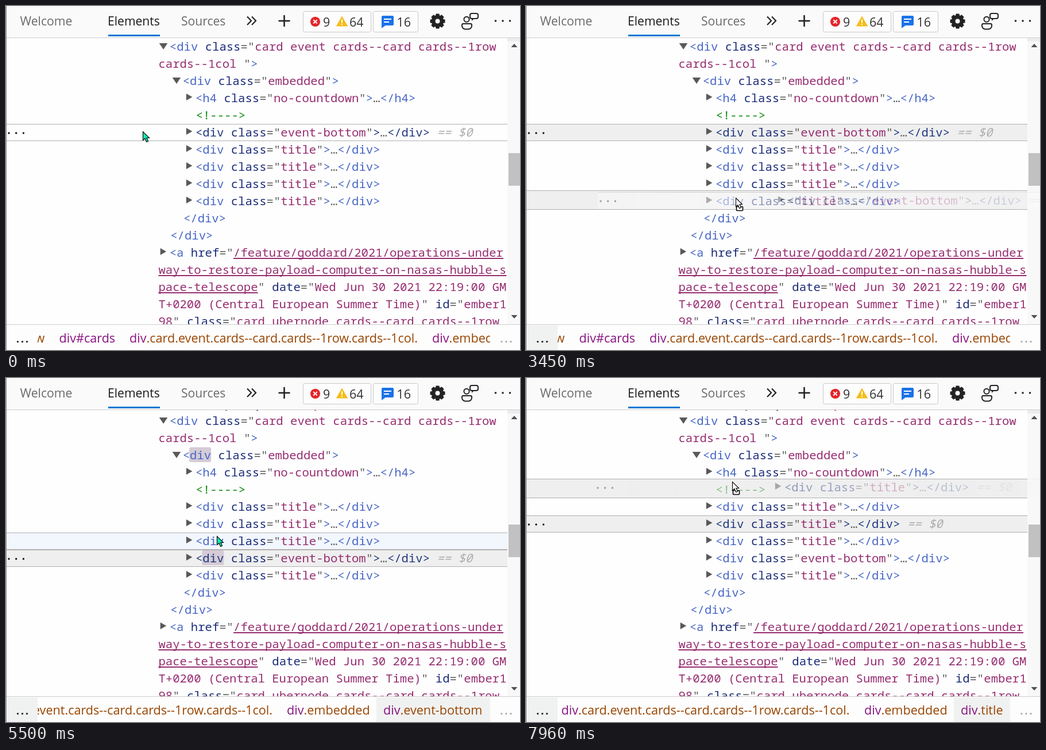
An HTML page with a canvas for the animation above (8000 ms loop, 895x601 px).

```html
<!DOCTYPE html>
<html lang="en">
<head>
<meta charset="utf-8">
<title>Reordering DOM nodes</title>
<style>
html, body { margin: 0; width: 100%; height: 100%; overflow: hidden; background: #fff; }
canvas { display: block; }
</style>
</head>
<body>
<canvas id="stage" width="895" height="601"></canvas>
<script>
const W = 895, H = 601, LOOP = 8000, ROW = 30, CELL = 12.37;
const MONO = '20.615px "Noto Sans Mono", monospace';
const UI = '"Open Sans", "Noto Sans", sans-serif';
const TAG = '#4867c6', TAG_SEL = '#21397f', ATTR = '#1b2c78', VAL = '#962d70', PUNCT = '#5c5c5c';
const GREEN = '#118a11', GREY = '#efefef', LINE = '#b0b0b0';
const stage = document.getElementById('stage').getContext('2d');
const ghostCanvas = document.createElement('canvas');
ghostCanvas.width = W;
ghostCanvas.height = ROW;
const ghostCtx = ghostCanvas.getContext('2d');

// Pointer tip: [time, x, y], each position held until the next.
const approach = [[0, 238, 219], [450, 262, 218], [570, 292, 217], [690, 322, 215], [840, 365, 214]];
const dragDown = [
  [1860, 365, 232], [1980, 366, 236], [2130, 367, 241], [2280, 368, 246], [2400, 369, 252],
  [2520, 369, 261], [2670, 370, 278], [2820, 370, 292], [2940, 369, 304], [3090, 368, 313],
  [3210, 367, 321], [3330, 366, 328], [3450, 365, 335], [3600, 365, 350], [3750, 365, 353],
  [3870, 365, 355], [4020, 365, 356]];
const browse = [
  [4270, 364, 354], [5110, 365, 338], [5230, 366, 312], [5350, 367, 290], [5500, 367, 276],
  [5620, 366, 268], [5740, 365, 260], [5860, 363, 254], [5980, 362, 252], [6970, 362, 253]];
const dragUp = [
  [7120, 359, 233], [7240, 359, 215], [7390, 359, 206], [7540, 359, 195], [7660, 359, 186],
  [7810, 359, 183], [7960, 359, 181]];
const pointerPath = [...approach, ...dragDown, ...browse, ...dragUp];

const within = (t, a, b) => t >= a && t < b;
const clamp = v => Math.max(0, Math.min(1, v));
const mix = (a, b, k) => `rgb(${a.map((v, i) => Math.round(v + (b[i] - v) * k))})`;

const attr = (name, value, close = true) =>
  [[ATTR, name], [PUNCT, '="'], [VAL, value], ...(close ? [[PUNCT, '"']] : [])];
const open = (tag, cls) => [[TAG, '<'], [TAG, tag], [TAG, ' '], ...attr('class', cls), [TAG, '>']];
const folded = (tag, cls) => ({
  x: 329.9, arrow: 'right',
  parts: [...open(tag, cls), [PUNCT, '…'], [TAG, `</${tag}>`]]
});
const wrapped = (...parts) => ({ x: 265.4, parts });

const titleRow = folded('div', 'title');
const bottomRow = folded('div', 'event-bottom');
const head = [
  { x: 284.8, arrow: 'down', parts: [[TAG, '<div '], ...attr('class', 'card event cards--card cards--1row', false)] },
  wrapped([VAL, 'cards--1col '], [PUNCT, '"'], [TAG, '>']),
  { x: 307.7, arrow: 'down', parts: open('div', 'embedded') },
  folded('h4', 'no-countdown'),
  { x: 330.6, parts: [[GREEN, '<!---->']] }
];
const tail = [
  { x: 308.9, parts: [[TAG, '</div>']] },
  { x: 286.2, parts: [[TAG, '</div>']] },
  { x: 284.7, arrow: 'right', parts: [[TAG, '<a '], [ATTR, 'href'], [PUNCT, '="'],
    [VAL, '/feature/goddard/2021/operations-under', true]] },
  wrapped([VAL, 'way-to-restore-payload-computer-on-nasas-hubble-s', true]),
  wrapped([VAL, 'pace-telescope', true], [PUNCT, '" '], ...attr('date', 'Wed Jun 30 2021 22:19:00 GM', false)),
  wrapped([VAL, 'T+0200 (Central European Summer Time)'], [PUNCT, '" '], ...attr('id', 'ember1', false)),
  wrapped([VAL, '98'], [PUNCT, '" '], ...attr('class', 'card ubernode cards--card cards--1row', false))
];

function rect(c, color, x, y, w, h) {
  c.fillStyle = color;
  c.fillRect(x, y, w, h);
}

function poly(c, points, fill, stroke, width = 1) {
  c.beginPath();
  points.forEach(([x, y]) => c.lineTo(x, y));
  c.closePath();
  if (fill) { c.fillStyle = fill; c.fill(); }
  if (stroke) { c.strokeStyle = stroke; c.lineWidth = width; c.stroke(); }
}

function path(c, points, color, width) {
  c.beginPath();
  points.forEach(([x, y], i) => i ? c.lineTo(x, y) : c.moveTo(x, y));
  c.strokeStyle = color;
  c.lineWidth = width;
  c.stroke();
}

function disc(c, x, y, r, fill, stroke, width) {
  c.beginPath();
  c.arc(x, y, r, 0, Math.PI * 2);
  if (fill) { c.fillStyle = fill; c.fill(); }
  if (stroke) { c.strokeStyle = stroke; c.lineWidth = width; c.stroke(); }
}

function box(c, x, y, w, h, r, fill, stroke, width = 1) {
  c.beginPath();
  c.roundRect(x, y, w, h, r);
  if (fill) { c.fillStyle = fill; c.fill(); }
  if (stroke) { c.strokeStyle = stroke; c.lineWidth = width; c.stroke(); }
}

function dots(c, x, y, gap, r, color) {
  for (let i = 0; i < 3; i++) disc(c, x + i * gap, y, r, color);
}

function label(c, text, x, y, size, color) {
  c.font = `${size}px ${UI}`;
  c.fillStyle = color;
  c.fillText(text, x, y);
  return c.measureText(text).width;
}

function band(c, top, bottom, fill) {
  if (fill) rect(c, fill, 1, top, 872, bottom - top);
  rect(c, LINE, 1, top, 872, 1);
  rect(c, LINE, 1, bottom - 1, 872, 1);
}

function drawRow(c, row, top, selected, flash) {
  let x = row.x;
  if (row.arrow === 'right') poly(c, [[x - 16, top + 7], [x - 5.5, top + 13], [x - 16, top + 19]], '#595959');
  if (row.arrow === 'down') poly(c, [[x - 18, top + 9], [x - 3.5, top + 9], [x - 10.7, top + 20]], '#595959');
  if (flash) {
    c.globalAlpha = flash.alpha;
    box(c, x + CELL - 1, top + 1, 3 * CELL + 1, 26, 3, flash.fill);
    c.globalAlpha = 1;
  }
  c.font = MONO;
  row.parts.forEach(([color, text, underline], i) => {
    if (selected && color === TAG) color = TAG_SEL;
    if (flash && !selected && i === 1) color = flash.text;
    c.fillStyle = color;
    c.fillText(text, x, top + 22);
    const width = text.length * CELL;
    if (underline) c.fillRect(x, top + 24, width, 2);
    x += width;
  });
  if (selected) {
    c.font = 'italic ' + MONO;
    c.fillStyle = '#adadad';
    c.fillText('== $0', x + CELL, top + 22);
    dots(c, 5, top + 16, 12.7, 1.7, '#111');
  }
}

function drawGhost(row, x, y, fill, cx, cy) {
  const g = ghostCtx;
  g.globalCompositeOperation = 'source-over';
  g.clearRect(0, 0, W, ROW);
  rect(g, fill, 0, 0, 873, ROW);
  rect(g, LINE, 0, 0, 873, 1);
  drawRow(g, row, 0, true);
  const fade = g.createRadialGradient(cx - x, cy - y, 0, cx - x, cy - y, 700);
  fade.addColorStop(0, 'rgba(0,0,0,.55)');
  fade.addColorStop(1, 'rgba(0,0,0,0)');
  g.globalCompositeOperation = 'destination-in';
  rect(g, fade, 0, 0, W, ROW);
  stage.drawImage(ghostCanvas, x, y);
}

function drawPointer(c, x, y, kind) {
  c.save();
  c.translate(x, y);
  if (kind === 'blocked') {
    for (const [color, width] of [['#000', 6], ['#fff', 1.4]]) {
      disc(c, 0, -7, 7, width > 2 ? '#ddd' : null, color, width);
      path(c, [[-5, -12], [5, -2]], color, width);
    }
  } else {
    if (kind === 'drop') box(c, 1.5, 15.5, 11, 7, 1, '#fff', '#000', 1.6);
    poly(c, [[0.5, 0.5], [0.5, 15.5], [4, 12.5], [6.7, 18.5], [9.5, 17.3], [7, 11.5], [11.5, 11.5]],
      kind === 'drop' ? '#fff' : '#0fe9b6', '#000', 1.1);
  }
  c.restore();
}

function drawToolbar(c) {
  rect(c, '#fafafa', 0, 0, W, 55);
  rect(c, '#cdcdcd', 0, 55, W, 1);
  label(c, 'Welcome', 24.5, 34, 21.2, '#6a6a6a');
  label(c, 'Elements', 177, 34, 21.1, '#1b1b1b');
  label(c, 'Sources', 305, 34, 21.1, '#6a6a6a');
  rect(c, '#0078d4', 178, 50, 90, 3);
  for (const x of [420, 428]) path(c, [[x, 18.5], [x + 7, 25.8], [x, 33]], '#222', 2.2);
  path(c, [[474.5, 26], [494.5, 26]], '#222', 2.6);
  path(c, [[484.5, 16], [484.5, 36]], '#222', 2.6);

  box(c, 517.5, 9.5, 118, 36, 3, '#fdfdfd', '#c9c9c9');
  disc(c, 538.5, 27.3, 8.6, '#e5252a');
  path(c, [[535.3, 24.1], [541.7, 30.5]], '#fff', 2);
  path(c, [[541.7, 24.1], [535.3, 30.5]], '#fff', 2);
  label(c, '9', 552, 36, 21.4, '#333');
  poly(c, [[585, 19.5], [593.5, 34.5], [576.5, 34.5]], '#f4bd1a', '#f4bd1a', 2);
  rect(c, '#fff', 584, 23.5, 2, 6);
  rect(c, '#fff', 584, 31, 2, 2);
  label(c, '64', 598, 36, 21.4, '#333');

  box(c, 639.5, 9.5, 78, 36, 3, '#fdfdfd', '#c9c9c9');
  box(c, 654, 17, 21, 17, 2, '#1a73e8');
  poly(c, [[654, 30], [662, 33], [654, 39]], '#1a73e8');
  rect(c, '#fff', 658, 22, 13, 2);
  rect(c, '#fff', 658, 27, 9, 2);
  label(c, '16', 680.5, 36, 21.4, '#333');

  c.save();
  c.translate(751.5, 26.5);
  for (let i = 0; i < 8; i++) {
    poly(c, [[-4, -8], [-2.8, -13], [2.8, -13], [4, -8]], '#222');
    c.rotate(Math.PI / 4);
  }
  disc(c, 0, 0, 7.3, null, '#222', 6.6);
  c.restore();

  disc(c, 802, 23.3, 4.6, null, '#222', 2);
  box(c, 794, 31, 17, 9.5, [2, 2, 6, 6], null, '#222', 2);
  box(c, 808, 13, 14, 9, 3, '#fafafa', '#222', 2);
  poly(c, [[811, 21], [816, 21], [811, 26]], '#222');
  dots(c, 852.5, 26, 12.5, 1.8, '#222');
}

function drawScrollbar(c, shift) {
  rect(c, '#f8f8f8', 873, 56, 22, 500);
  rect(c, '#ececec', 873, 56, 22, 6);
  rect(c, '#c1c1c1', 875, shift ? 256 : 257, 20, 57);
  poly(c, [[879.5, 72], [885, 66], [890.5, 72]], '#505050');
  poly(c, [[879.5, 540], [885, 546], [890.5, 540]], '#505050');
}

function crumb(c, text, x) {
  const [, element, rest] = text.match(/^(div)?(.*)$/);
  const width = element ? label(c, element, x, 588, 21.6, '#881280') : 0;
  label(c, rest, x + width, 588, 21.6, rest[0] === '#' ? '#881280' : '#994500');
}

function drawCrumbs(c, t, active) {
  const card = 'div.card.event.cards--card.cards--1row.cards--1col.';
  rect(c, '#fdfdfd', 0, 556, W, 45);
  rect(c, '#cdcdcd', 0, 556, W, 1);
  if (active) rect(c, '#f0f1f1', 2, 558, 53, 43);
  c.save();
  c.beginPath();
  c.rect(55, 557, 788, 44);
  c.clip();
  let items, selectedX;
  if (t < 5230) {
    items = [['w', 50.5], ['div#cards', 92.5], [card, 215], ['div.embedded', 742]];
  } else if (t < 6100) {
    items = [[card, -38], ['div.embedded', 489], ['div.event-bottom', 657]];
    selectedX = 645;
  } else {
    items = [[card, 61.5], ['div.embedded', 589], ['div.title', 757]];
    selectedX = 745;
  }
  if (active && selectedX) rect(c, '#f0f1f1', selectedX, 558, 843 - selectedX, 43);
  items.forEach(([text, x]) => crumb(c, text, x));
  c.restore();
  dots(c, 20.5, 586.5, 8, 1.7, '#333');
  dots(c, 863, 586.5, 8, 1.7, '#b0b0b0');
}

function flashAt(t) {
  if (!within(t, 4270, 6220)) return null;
  const k = clamp((t - 4270) / 900);
  return {
    fill: mix([131, 15, 124], [213, 203, 214], k),
    text: mix([255, 255, 255], [72, 103, 198], k),
    alpha: 1 - clamp((t - 5500) / 720)
  };
}

function draw(time) {
  const [, px, py] = pointerPath.findLast(p => p[0] <= time);
  const c = stage;
  const moved = time >= 4270, shift = moved ? 4 : 0;
  const down = within(time, 1860, 4270), up = time >= 7120;
  const focused = within(time, 2280, 2670) || within(time, 2820, 7120) || time >= 7390;
  const selected = !moved ? 5 : time < 6100 ? 8 : 6;
  const children = Array(4).fill(titleRow);
  children.splice(moved ? 3 : 0, 0, bottomRow);
  const rows = [...head, ...children, ...tail];
  const topOf = i => 56 + shift + i * ROW;
  const under = Math.floor((py - 56 - shift) / ROW);
  const flash = flashAt(time);

  rect(c, '#fefefe', 0, 0, W, H);
  c.save();
  c.beginPath();
  c.rect(0, 55, W, 501);
  c.clip();
  if (moved) {
    for (const [x, color] of [[382, PUNCT], [436, ATTR], [537, '#c33']]) rect(c, color, x, 55, 3, 2);
  }
  band(c, topOf(selected), topOf(selected) + ROW, focused ? GREY : null);
  if (moved && !up && under !== selected) band(c, topOf(under), topOf(under) + ROW, '#f2f6fd');
  const dropping = up || (down && time >= 2280 && !within(time, 2670, 2820));
  if (dropping && under !== selected) band(c, topOf(under) - 4, topOf(under) + ROW, GREY);
  drawScrollbar(c, shift);
  // Faint trail left behind by the drag image.
  if (within(time, 1860, 2820)) rect(c, '#f0f0f0', 126, 214, 769, time < 1980 ? 22 : 7);
  if (within(time, 7240, 7390)) rect(c, '#f0f0f0', 121, 241, 752, 18);
  rows.forEach((row, i) => {
    const flashing = i === 2 || i === 8;
    drawRow(c, row, topOf(i), i === selected, flashing && flash);
  });
  if (down) drawGhost(bottomRow, px - 240, py - 10, '#fcfcfc', px, py);
  if (up) drawGhost(titleRow, px - 239, py - 5, GREY, px, py);
  c.restore();

  drawToolbar(c);
  drawCrumbs(c, time, focused && !within(time, 4270, 5230));
  rect(c, '#858585', 0, 0, 1, H);
  drawPointer(c, px, py, down && time < 2280 ? 'blocked' : down || up ? 'drop' : 'arrow');
}

const start = performance.now();
function tick() {
  draw((performance.now() - start) % LOOP);
  requestAnimationFrame(tick);
}
tick();
</script>
</body>
</html>
```
